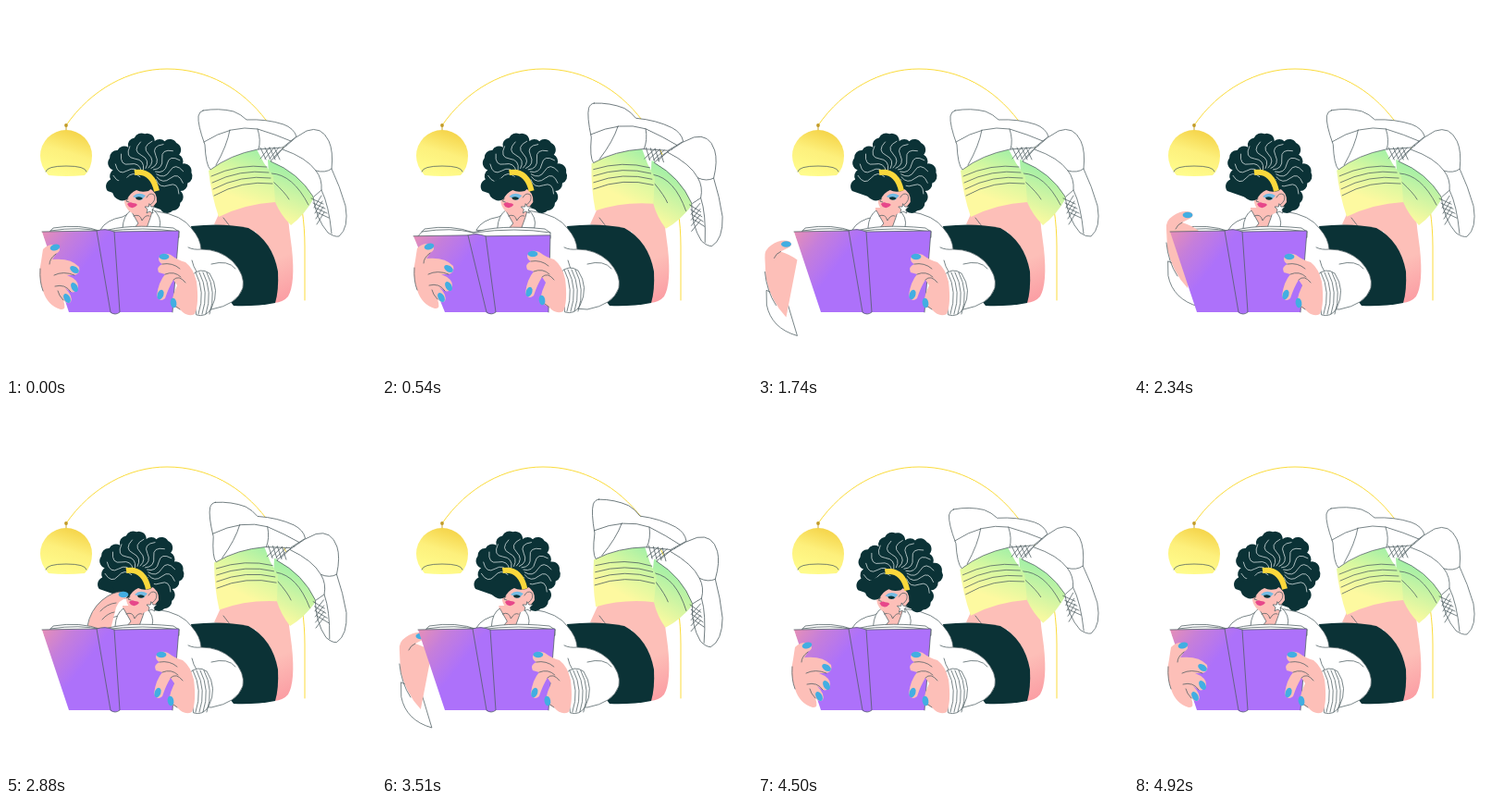
Recreate the animation shown at these times as an HTML page. Size 400 by 400 pixels, loop 4.95 s.

```html
<!DOCTYPE html>
<html>
<head>
<meta charset="utf-8">
<style>
html, body { margin: 0; width: 100%; height: 100%; overflow: hidden; background: #fff }
svg { display: block; width: 100vw; height: 100vh }
path { stroke-linecap: round; stroke-linejoin: round }
.w { fill: #fff; stroke: #4d5c60; stroke-width: .75 }
.l { fill: none; stroke: #4d5c60; stroke-width: .75 }
.s { fill: #fdbfb8 }
.d { fill: #0b3236 }
.h { fill: none; stroke: #dfe9e8; stroke-width: .75 }
</style>
</head>
<body>
<svg viewBox="0 0 400 400">
<defs>
  <linearGradient id="lamp" x1=".75" y1="0" x2=".4" y2="1">
    <stop offset="0" stop-color="#f4d144"/><stop offset=".5" stop-color="#fdf07c"/><stop offset="1" stop-color="#fffc8c"/>
  </linearGradient>
  <linearGradient id="sock" gradientUnits="userSpaceOnUse" x1="275" y1="158" x2="256" y2="210">
    <stop offset="0" stop-color="#a6f0a6"/><stop offset=".5" stop-color="#d9f8a0"/><stop offset="1" stop-color="#fdf9a0"/>
  </linearGradient>
  <linearGradient id="sock2" gradientUnits="userSpaceOnUse" x1="316" y1="182" x2="298" y2="228">
    <stop offset="0" stop-color="#a6f0a6"/><stop offset="1" stop-color="#f6f9a0"/>
  </linearGradient>
  <linearGradient id="leg" gradientUnits="userSpaceOnUse" x1="285" y1="255" x2="310" y2="315">
    <stop offset=".3" stop-color="#fdbfb8"/><stop offset="1" stop-color="#fb9da3"/>
  </linearGradient>
  <linearGradient id="cover" gradientUnits="userSpaceOnUse" x1="40" y1="244" x2="86" y2="280">
    <stop offset="0" stop-color="#e58fb8"/><stop offset=".45" stop-color="#c57edb"/><stop offset="1" stop-color="#ad71fa"/>
  </linearGradient>
  <ellipse id="nail" rx="5.4" ry="3.3" fill="#42aee2"/>
</defs>

<path d="M65 129C92 90 133 68 174 68C262 68 323 153 323 260V318" fill="none" stroke="#fbdc3c"/>
<path d="M65 129V135" stroke="#c9a62c"/>
<circle cx="65" cy="129" r="1.9" fill="#c29b28"/>
<path d="M46 183Q37 173 37 162A28 28 0 0 1 93 162Q93 175 85 183Q65 185 46 183Z" fill="url(#lamp)"/>
<path class="l" d="M43 179Q44 173 65 173Q86 173 87 179"/>

<path d="M225 236L236 212L290 198L304 219Q306 242 309 262Q313 300 305 314Q300 320 290 321L270 244Z" fill="url(#leg)"/>
<path class="l" d="M235 229L242 238"/>

<g id="feet">
  <path d="M283 166Q310 173 334 206Q322 227 308 237Q297 226 291 212L284 182Z" fill="url(#sock2)"/>
  <path class="l" d="M287 181Q310 182 327 215M289 190Q302 202 306 209"/>
  <path class="w" d="M303 151Q313 141 325 135Q341 129 349 146Q354 157 352 176Q361 195 367 216Q371 240 360 249Q355 250 348 245Q335 230 332 206Q316 180 286 168Q294 157 303 151Z"/>
  <path class="l" d="M299 155Q325 164 335 178Q342 187 341 199Q349 215 352 246M341 199L333 206M335 178Q345 181 352 176"/>
  <path d="M219 178Q245 160 271 155L279 170L289 184L291 212Q258 214 230 228Q222 205 219 178Z" fill="url(#sock)"/>
  <path class="l" id="folds"/>
  <path class="w" d="M213 113Q230 110 246 114Q254 117 260 123Q282 122 300 128Q311 132 314 141L299 153L272 155Q242 161 221 177Q216 172 215 150Q207 128 208 119Q209 114 213 113Z"/>
  <path class="l" d="M214 147Q244 128 272 133Q292 139 308 146M242 134Q239 151 227 172M272 133Q276 145 273 155"/>
  <path class="l" id="laces"/>
</g>

<path class="d" d="M200 238Q235 234 262 240Q288 254 294 287Q295 308 291 321Q270 325 246 324L205 270Z"/>
<path class="w" d="M102 242Q108 231 126 228Q140 218 163 222Q191 226 201 241Q210 251 211 263Q231 263 245 276Q259 291 256 305Q250 323 222 328L180 325L160 245Z"/>
<path class="l" d="M211 263Q203 264 197 261M222 279Q240 274 248 284M207 289Q202 281 201 275"/>
<g id="neck">
  <path class="s" d="M134 218H158L156 241H135Z"/>
  <path class="w" d="M126 240Q127 226 135 221L143 235L138 241ZM159 220Q169 228 166 240H152L156 229Z"/>
  <path class="l" d="M138 227Q145 224 147 232Q151 225 155 227"/>
</g>

<g id="head">
  <path id="hair" class="d"/>
  <path id="strands" class="h"/>
  <g id="face">
    <path class="s" d="M128 204Q140 191 153 196Q164 201 163 212Q156 222 146 226Q134 225 131 219Q127 214 128 204Z"/>
    <path class="d" d="M113 197Q122 185 141 184L157 190Q160 196 154 200Q146 202 141 199Q134 202 131 209Q124 213 117 206Z"/>
    <path d="M137 206Q143 200 151 205L146 210Z" fill="#73bce4"/>
    <path class="d" d="M140 207Q145 205 148 208Q145 211 141 209Z"/>
    <path d="M131 214Q134 211 137 213Q141 213 142 215Q138 220 133 217Z" fill="#e7478a"/>
    <path class="l" d="M152 207Q155 201 160 204Q163 210 156 215M132 208L130 211L133 212"/>
    <path class="w" d="M155 214l2 3 4 0-3 3 1 4-4-2-3 2 1-4-3-3 4 0Z"/>
  </g>
  <path d="M139 180Q158 177 163 200" fill="none" stroke="#fbd83c" stroke-width="6" style="stroke-linecap:butt"/>
</g>

<g id="rest">
  <path class="s" d="M88 244Q90 224 104 212Q116 202 127 203Q134 205 130 210Q122 212 119 220L113 244Z"/>
  <path class="l" d="M88 240Q91 223 104 212Q116 202 127 203M102 224Q109 216 119 215M104 233Q110 226 117 225"/>
  <use href="#nail" x="127" y="206"/>
</g>

<g id="pages">
  <path class="w" d="M42 250L51 240Q80 235 104 244Q130 235 181 240L187 244V250Z"/>
  <path class="l" d="M48 243Q80 238 104 244Q150 238 187 244"/>
</g>

<g id="turn">
  <path class="w" d="M37 276Q46 280 58 285L70 325Q42 317 37 292Z"/>
  <path class="s" d="M35 241Q34 232 42 227Q52 220 62 223Q66 227 60 230L52 234Q62 237 70 243L58 305Q41 287 36 262Z"/>
  <path class="l" d="M52 234Q47 236 45 241M47 292Q37 277 35 256"/>
  <use href="#nail" x="58" y="226"/>
</g>

<g id="book">
  <path d="M39 244L98 243L107 241L117 244L187 243L180 331L123 331Q117 335 112 331H68Z" fill="url(#cover)"/>
  <path class="l" d="M39 244L98 243Q107 240 117 244L187 243L180 331M98 243L113 331Q118 335 123 331L117 244"/>
</g>

<g id="left">
  <path class="s" d="M40 263Q47 256 56 259Q61 264 54 268L50 274Q70 272 79 282Q81 289 74 291L66 291Q79 296 78 304Q76 311 70 309L64 305Q73 314 70 320Q66 323 62 318Q66 329 59 328Q45 324 40 308Q34 292 38 276Z"/>
  <path class="l" d="M54 268Q47 273 47 279M74 291Q62 286 52 291M70 309Q64 300 53 303M62 318Q57 313 56 308M40 308Q36 298 37 284"/>
  <use href="#nail" transform="translate(53 261) rotate(-15)"/>
  <use href="#nail" transform="translate(74 285) rotate(35)"/>
  <use href="#nail" transform="translate(74 304) rotate(60)"/>
  <use href="#nail" transform="translate(66 316) rotate(60)"/>
</g>

<g id="right">
  <path class="w" d="M201 291Q210 282 220 289Q232 307 222 327Q216 337 206 334Z"/>
  <path class="l" id="ribs"/>
  <path class="s" d="M165 273Q168 265 178 269Q186 275 194 277Q203 284 206 298Q209 322 204 333Q196 337 188 328Q182 326 179 320Q181 310 185 302L181 296Q176 304 172 316Q166 321 163 313Q165 298 172 290L165 288Q162 282 169 279Q165 277 165 273Z"/>
  <path class="l" d="M169 279Q180 277 188 284M172 290Q182 286 189 293M181 296Q187 290 194 299M188 328Q183 325 179 320"/>
  <use href="#nail" x="171" y="271"/>
  <use href="#nail" transform="translate(167 312) rotate(-70)"/>
  <use href="#nail" transform="translate(181 321) rotate(80)"/>
</g>
</svg>

<script>
const $ = id => document.getElementById(id);
const repeat = (id, n, part) => $(id).setAttribute('d', Array.from({ length: n }, (_, i) => part(i)).join(''));

// Point around the centre of the hair, angle in degrees
function polar(angle, r) {
  const a = angle * Math.PI / 180;
  return `${154 + r * Math.cos(a)} ${184 + r * Math.sin(a)} `;
}
repeat('hair', 19, i => {
  const p = polar(160 + i * 15, 42.5 + 4.5 * Math.cos(i * 1.9));
  return i ? `A8 8 0 0 1 ${p}` : `M${p}`;
});
repeat('strands', 12, i => {
  const a = 175 + i * 19;
  return `M${polar(a, 9)}Q${polar(a + 26, 18)}${polar(a, 24)}T${polar(a + 6, 38)}`;
});

repeat('folds', 4, i => `M${222 + i} ${184 + i * 7}Q${252 + i} ${170 + i * 6} ${282 + i * 2} ${174 + i * 6}`);
repeat('laces', 4, i => `M${275 + i * 5} 153l6 13M${275 + i * 5} 165l10 -12` +
  `M${330 + i * 2} ${208 + i * 5}l13 6M${341 + i} ${205 + i * 6}l-8 13`);
repeat('ribs', 4, i => `M${205 + i * 4} 288Q${216 + i * 4} 309 ${208 + i * 4} 333`);

function ramp(t, from, to) {
  const p = Math.min(1, Math.max(0, (t - from) / (to - from)));
  return p * p * (3 - 2 * p);
}
// Rises from 0 to 1 between a and b, falls back between c and d
const pulse = (t, a, b, c, d) => ramp(t, a, b) - ramp(t, c, d);
const move = (id, x, y) => $(id).setAttribute('transform', `translate(${x} ${y})`);
const show = (id, on) => $(id).style.display = on ? '' : 'none';

function draw(now) {
  const t = now % 4950;
  const swing = 9.5 * pulse(t, 0, 750, 750, 1580) + 11 * pulse(t, 2250, 3400, 3400, 4050)
    - 1.5 * pulse(t, 3400, 4050, 4050, 4950);
  $('feet').setAttribute('transform', `rotate(${swing} 280 230)`);

  const turned = pulse(t, 0, 2200, 3300, 4950);
  const nod = 5 * pulse(t, 3500, 4050, 4100, 4700);
  move('head', -9 * turned, nod);
  move('face', 11 * turned, 0);
  move('neck', -8 * turned, 0);

  const tilt = pulse(t, 0, 450, 700, 1100);
  $('book').setAttribute('transform', `translate(0 331) matrix(1 0 ${tilt * .057} ${1 - tilt * .055} 0 0) translate(0 -331)`);
  move('pages', -5 * tilt, tilt);
  move('right', -8 * tilt - 3 * pulse(t, 1700, 2300, 3300, 3900), -3 * tilt);

  // The left hand lets go, lifts a page, rests by the face and comes back
  const away = pulse(t, 1250, 1700, 3580, 3950);
  const raised = pulse(t, 1700, 2250, 3300, 3580);
  const reach = pulse(t, 2380, 2680, 3300, 3580);
  const near = pulse(t, 2580, 2820, 3270, 3400);
  move('left', -29 * away - 2 * tilt, -tilt);
  move('turn', 28 * (raised - 1) + 50 * reach, 32 * (1 - raised) - 14 * reach);
  move('rest', 22 * (near - 1), 10 * (1 - near));

  const lifted = t > 1700 && t < 3580, resting = t > 2580 && t < 3400;
  show('left', !lifted);
  show('turn', lifted && !resting);
  show('rest', resting);
  requestAnimationFrame(draw);
}
draw(0);
</script>
</body>
</html>
```
